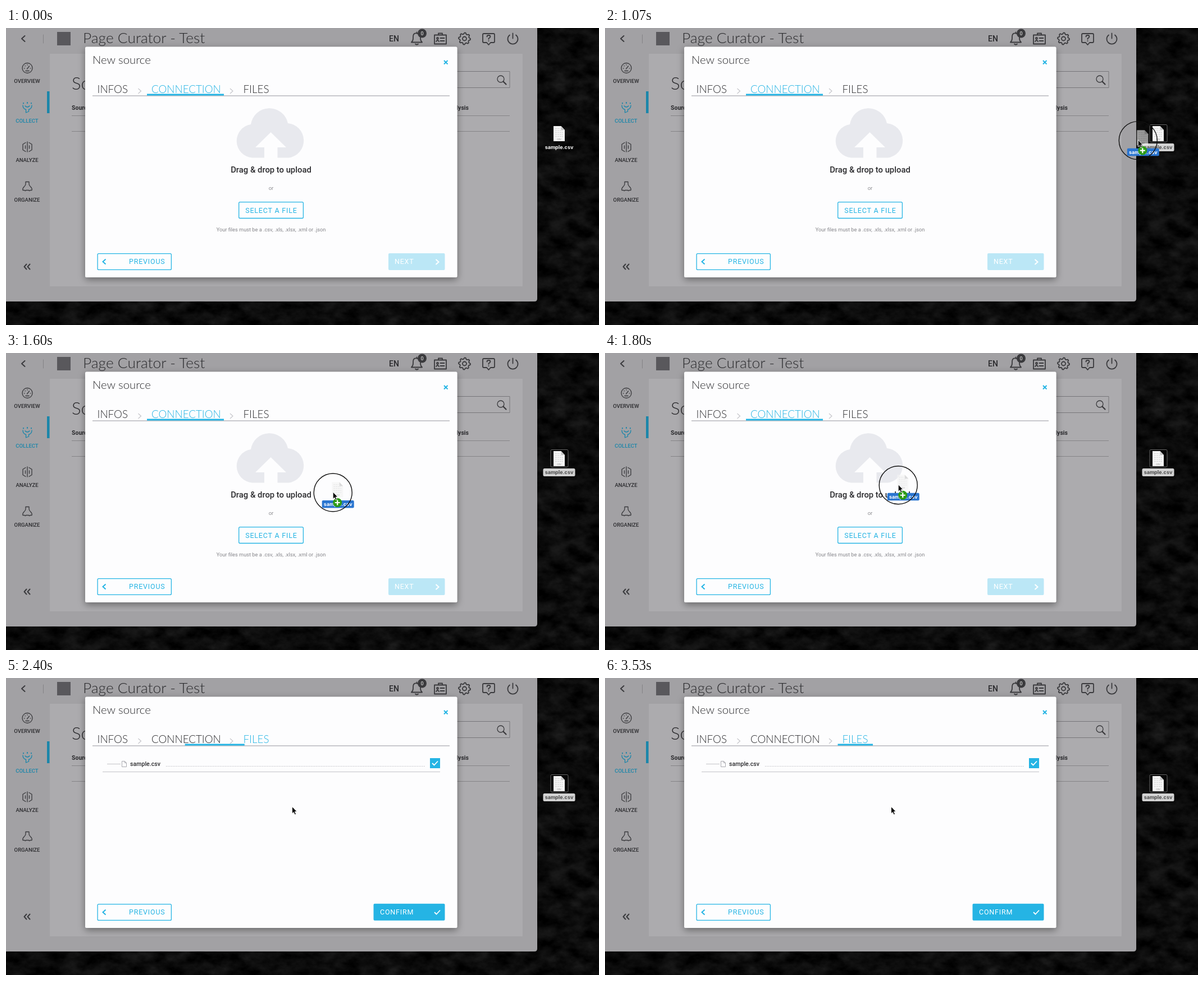
These frames come from a looping animation (1056 px wide and 530 px high, 3.59 s). An HTML page:

```html
<!DOCTYPE html>
<html lang="en">
<head>
<meta charset="utf-8">
<title>Drag and drop upload</title>
<style>
  html, body { margin: 0; width: 100%; height: 100%; overflow: hidden; background: #0c0c0c; }
  svg { display: block; width: 100vw; height: 100vh; }
  text { font-family: Roboto, sans-serif; fill: #2b2b2e; }
  .display { font-family: Lato, sans-serif; font-weight: 300; }
  .tab { font-family: Lato, sans-serif; font-weight: 300; font-size: 18.8px; }
  .nav { font-size: 9.5px; font-weight: 500; text-anchor: middle; }
  .strong { font-weight: 500; }
  .mid { text-anchor: middle; }
  .button { font-size: 12.5px; letter-spacing: .8px; }
  .label { font: 700 9px Inter, sans-serif; text-anchor: middle; }
  .icon { fill: none; stroke: #3a3a3d; stroke-width: 1.3; stroke-linecap: round; stroke-linejoin: round; }
  .blue { fill: #25b4e4; }
  .white { fill: #fff; }
  .blueLine { fill: none; stroke: #25b4e4; stroke-width: 1.3; }
  .thick { stroke-width: 2; }
  .tick { fill: none; stroke: #fff; stroke-width: 1.8; }
  .dimBlue { stroke: #1a86aa; }
  .rule { stroke: #858487; }
</style>
</head>
<body>
<svg viewBox="0 0 1056 530" preserveAspectRatio="none">
  <defs>
    <filter id="rock" x="0" y="0" width="1" height="1" color-interpolation-filters="sRGB">
      <feTurbulence type="fractalNoise" baseFrequency=".03 .045" numOctaves="5" seed="7"/>
      <feColorMatrix values=".18 0 0 0 -.045  .18 0 0 0 -.045  .18 0 0 0 -.045  0 0 0 0 1"/>
    </filter>
    <filter id="shadow" x="-10%" y="-10%" width="120%" height="125%">
      <feDropShadow dx="0" dy="4" stdDeviation="6.500" flood-opacity=".4"/>
    </filter>
    <g id="file">
      <path d="M-10-13.500H3.500L10-6.500V13.500H-10Z" fill="#f4f4f4"/>
      <path d="M3.500-13.500V-6.500H10Z" fill="#c4c4c4"/>
      <path d="M-7-9H2M-7-5.500H6M-7-2H7M-7 1.500H7M-7 5H7" stroke="#d4d4d4" stroke-dasharray="3 1" fill="none"/>
      <text y="11.500" font-size="4" class="mid" style="fill:#888">CSV</text>
    </g>
    <path id="chevron" d="M-2.500-4.500L2.500 0L-2.500 4.500"/>
  </defs>

  <rect width="1056" height="530" filter="url(#rock)"/>

  <!-- Dimmed application window -->
  <path d="M0 0H946V483q0 5-5 5H0Z" fill="#a2a1a4"/>
  <rect x="78" y="46" width="842" height="415" fill="#acabae"/>
  <rect x="73" y="113" width="4.500" height="39" fill="#1a86aa"/>

  <g class="icon">
    <path d="M33.500 14L28 19l5.500 5" class="thick"/>
    <path d="M66.500 12v15" stroke="#858487" stroke-width="1"/>
    <g stroke-width="1.800">
      <path d="M722 25.500h19q-3-3-3-7v-3q0-5-6.500-6t-6.500 6v3q0 4-3 7ZM729 28.500q2.500 2 5 0M731.500 9V7.500"/>
      <path d="M763 12.500h21v16h-21ZM770 12v-2.500h7V12M773.500 18h7M773.500 23h7"/>
      <circle cx="768.500" cy="18.500" r="1.500"/><path d="M766 24q2.500-4 5 0"/>
      <path id="gear"/><circle cx="816.500" cy="19" r="3.500"/>
      <path d="M851 10h17q2 0 2 2v12q0 2-2 2h-5l-3.500 4-3.500-4h-5q-2 0-2-2V12q0-2 2-2ZM856.500 15.500q0-2.500 3-2.500t3 2.500q0 1.500-3 3v1.500M859.500 23v.2"/>
      <path d="M897 12.500a9 9 0 1 0 11 0M902.500 9.500v9"/>
    </g>
    <path d="M800 77.500H897V106.500H800" stroke="#77767a" stroke-width="1"/>
    <circle cx="881" cy="91" r="6"/><path d="M885.500 95.500l5 5" stroke-width="2.300"/>

    <circle cx="38" cy="71.500" r="9"/>
    <path d="M37.500 73l4-5M32.500 72h.5M38 65.500v.5M34 67.500l.3.300M43.500 72h.3M35 76.500h6"/>
    <g class="dimBlue">
      <path d="M30 138q0 6 5.500 7.500v5.500l5-2v-3.500q5.500-1.500 5.500-7.500M34 139q4 4 8 0"/>
      <path d="M31 134v.5M38 133v1M45 134v.5" class="thick"/>
    </g>
    <path d="M35 204.500l-5 3v10l5 3M41 204.500l5 3v10l-5 3M38 203v18M34.500 210v5M41.500 210v5"/>
    <path d="M35 274.500h6v4q0 2 3 5t2 6h-3q-1 2-2.500 0h-5q-1.500 2-2.500 0h-3q-1-3 2-6t3-5Z"/>
    <path d="M36.500 421.500L32.500 426l4 4.500M42.500 421.500L38.500 426l4 4.500" class="thick"/>
  </g>
  <rect x="91" y="7" width="24" height="24" fill="#59585c"/>
  <text class="display" x="137" y="26.500" font-size="26.400">Page Curator - Test</text>
  <text class="strong" x="682" y="24" font-size="14">EN</text>
  <circle cx="741" cy="9.500" r="8" fill="#3a3a3d"/>
  <text class="mid strong" x="741" y="13" font-size="9" style="fill:#ccc">0</text>
  <text class="nav" x="37.500" y="98">OVERVIEW</text>
  <text class="nav" x="37.500" y="168.500" style="fill:#1a86aa">COLLECT</text>
  <text class="nav" x="37.500" y="239">ANALYZE</text>
  <text class="nav" x="37.500" y="309.500">ORGANIZE</text>
  <text class="display" x="117" y="110" font-size="31">Sources</text>
  <text x="117" y="146" font-size="10.500" font-weight="700">Source</text>
  <text x="824" y="146" font-size="10.500" font-weight="700" text-anchor="end">Last analysis</text>
  <path class="rule" d="M117 156.500H897M117 184.500H897"/>

  <!-- Desktop file -->
  <g id="selection">
    <rect x="970" y="172.500" width="31" height="31" rx="2" fill="#060606" stroke="#666"/>
    <rect x="956.500" y="206" width="57" height="14" rx="2.500" fill="#d2d2d2"/>
  </g>
  <use href="#file" x="985" y="188.500"/>
  <text id="fileLabel" class="label" x="985" y="216.200">sample.csv</text>

  <!-- Dialog -->
  <rect id="dialog" x="141" y="33.500" width="662.500" height="411.500" rx="2.500" fill="#fdfdfe" filter="url(#shadow)"/>
  <text class="display" x="154" y="64" font-size="20.300">New source</text>
  <path d="M780 58l6.500 6.500M786.500 58l-6.500 6.500" class="blueLine thick"/>
  <path d="M154 121H790" stroke="#b9b9bd" stroke-width="1.400"/>
  <rect id="inkBar" y="117.500" height="3" class="blue"/>
  <text class="tab" x="162.500" y="115.500">INFOS</text>
  <text class="tab" x="259" y="115.500" id="connectionTab">CONNECTION</text>
  <text class="tab" x="422.500" y="115.500" id="filesTab">FILES</text>
  <g fill="none" stroke="#c6c6ca" stroke-width="1.200">
    <use href="#chevron" x="238" y="112.500"/><use href="#chevron" x="401.500" y="112.500"/>
  </g>

  <g id="uploadPane">
    <path d="M438 231.500A30 30 0 0 1 436 172A33.500 33.500 0 0 1 502 170A31 31 0 0 1 504 231.500Z" fill="#e8e9ee"/>
    <path d="M471.500 186L499 213H483.500V232.500H460V213H444Z" fill="#fdfdfe"/>
    <text class="mid strong" x="472" y="257.500" font-size="14.800">Drag &amp; drop to upload</text>
    <text class="mid" x="472" y="289" font-size="9.500" style="fill:#8b8b90">or</text>
    <rect class="blueLine" x="414.700" y="310.700" width="114.700" height="28.800" rx="2"/>
    <text class="button mid" x="472.400" y="329.500" style="fill:#25b4e4">SELECT A FILE</text>
    <text class="mid" x="472" y="363" font-size="9.250" style="fill:#85858a">Your files must be a .csv, .xls, .xlsx, .xml or .json</text>
    <rect x="681" y="402" width="100.500" height="30" rx="2" fill="#bbe7f6"/>
    <text class="button" x="692" y="421.300" style="fill:#fff">NEXT</text>
    <use href="#chevron" x="768" y="417.500" fill="none" stroke="#fff" stroke-width="2"/>
  </g>

  <g id="filesPane">
    <path d="M180 153.500H204" stroke="#c2c2c6"/>
    <path d="M206.500 148.500h5l3 3v7h-8ZM211.500 148.500v3h3" fill="none" stroke="#aaaab0"/>
    <text class="strong" x="221" y="157.300" font-size="10.600">sample.csv</text>
    <path d="M285 157.500H747" stroke="#bdbdc2" stroke-dasharray="1.500 1.500"/>
    <path d="M172 167.500H773" stroke="#c2c2c6"/>
    <rect class="blue" x="755" y="143" width="18" height="18"/>
    <path class="tick" d="M759 152l3.500 3.500 6.500-7"/>
    <rect class="blue" x="654.500" y="402.700" width="127" height="30" rx="2"/>
    <text class="button" x="666" y="422.200" style="fill:#fff">CONFIRM</text>
    <path class="tick" d="M763 418l3.500 3.500 6.500-7"/>
  </g>

  <g id="previous">
    <rect class="blueLine" x="163.100" y="402.600" width="131.300" height="28.800" rx="2"/>
    <path d="M177.500 412.500L172.500 417l5 4.500" class="blueLine thick"/>
    <text class="button" x="219" y="421.300" style="fill:#25b4e4">PREVIOUS</text>
  </g>

  <!-- Pointer and dragged copy -->
  <g id="pointer">
    <g id="dragged">
      <use href="#file" x="8" y="-4" opacity=".6"/>
      <rect x="-19.500" y="15" width="57" height="13.500" rx="2" fill="#2a75d0"/>
      <text class="label" x="9" y="25" style="fill:#fff">sample.csv</text>
      <circle cx="8" cy="19" r="8" fill="#2d9b16"/>
      <path d="M3.500 19h9M8 14.500v9" stroke="#fff" stroke-width="2.200"/>
      <circle cy="1" r="34" fill="none" stroke="#111" stroke-width="1.400"/>
    </g>
    <path d="M0 0V12.500L2.800 10L4.800 14.400L7 13.400L5 9H8.600Z" fill="#050505" stroke="#fff" stroke-width=".9"/>
  </g>
</svg>
<script>
  const LOOP = 3590, STEP = LOOP / 54;
  const PRESS = 860, DRAG = 925, DROP = 1925, SWITCH = 2320, SLIDE = 450;

  // Pointer path: time, x, y
  const path = [
    [66, 1066, 226], [133, 1045, 219], [270, 1020, 205], [400, 1002, 196], [600, 991, 191],
    [PRESS, 991, 191], [DRAG, 978, 192], [1070, 948, 200], [1200, 848, 217], [1330, 731, 231],
    [1463, 645, 243], [1596, 582, 248], [1730, 535, 240], [1860, 509.5, 229.5]
  ];

  const $ = id => document.getElementById(id);
  const mix = (a, b, k) => a + (b - a) * k;
  const clamp = k => Math.max(0, Math.min(1, k));
  const show = (id, on) => $(id).setAttribute('visibility', on ? 'visible' : 'hidden');

  function pointerAt(t) {
    const next = path.findIndex(p => p[0] > t);
    if (next < 0) return path[path.length - 1].slice(1);
    if (next === 0) return path[0].slice(1);
    const [t0, x0, y0] = path[next - 1], [t1, x1, y1] = path[next];
    const k = (t - t0) / (t1 - t0);
    return [mix(x0, x1, k), mix(y0, y1, k)];
  }

  function gearOutline() {
    const points = [];
    for (let i = 0; i < 32; i++) {
      const angle = i * Math.PI / 16, r = i % 4 < 2 ? 10.5 : 8.3;
      points.push(`${816.5 + r * Math.cos(angle)} ${19 + r * Math.sin(angle)}`);
    }
    return 'M' + points.join('L') + 'Z';
  }

  function draw(t) {
    const [x, y] = pointerAt(t);
    $('pointer').setAttribute('transform', `translate(${x} ${y})`);
    show('dragged', t >= DRAG && t < DROP);

    const selected = t >= PRESS;
    show('selection', selected);
    $('fileLabel').style.fill = selected ? '#4a4a4a' : '#fff';

    const files = t >= SWITCH;
    show('uploadPane', !files);
    show('filesPane', files);
    $('connectionTab').style.fill = files ? '#2b2b2e' : '#25b4e4';
    $('filesTab').style.fill = files ? '#25b4e4' : '#2b2b2e';
    $('dialog').setAttribute('height', files ? 412.5 : 411.5);
    $('previous').setAttribute('transform', `translate(0 ${files ? 1 : 0})`);

    const slide = 1 - (1 - clamp((t - SWITCH) / SLIDE)) ** 3;
    const left = mix(251, 414.5, slide), right = mix(388, 477, slide);
    $('inkBar').setAttribute('x', left);
    $('inkBar').setAttribute('width', right - left);
  }

  $('gear').setAttribute('d', gearOutline());
  const start = performance.now();
  function tick() {
    const t = (performance.now() - start) % LOOP;
    draw(Math.floor((t + 2) / STEP) * STEP % LOOP);
    requestAnimationFrame(tick);
  }
  tick();
</script>
</body>
</html>
```
